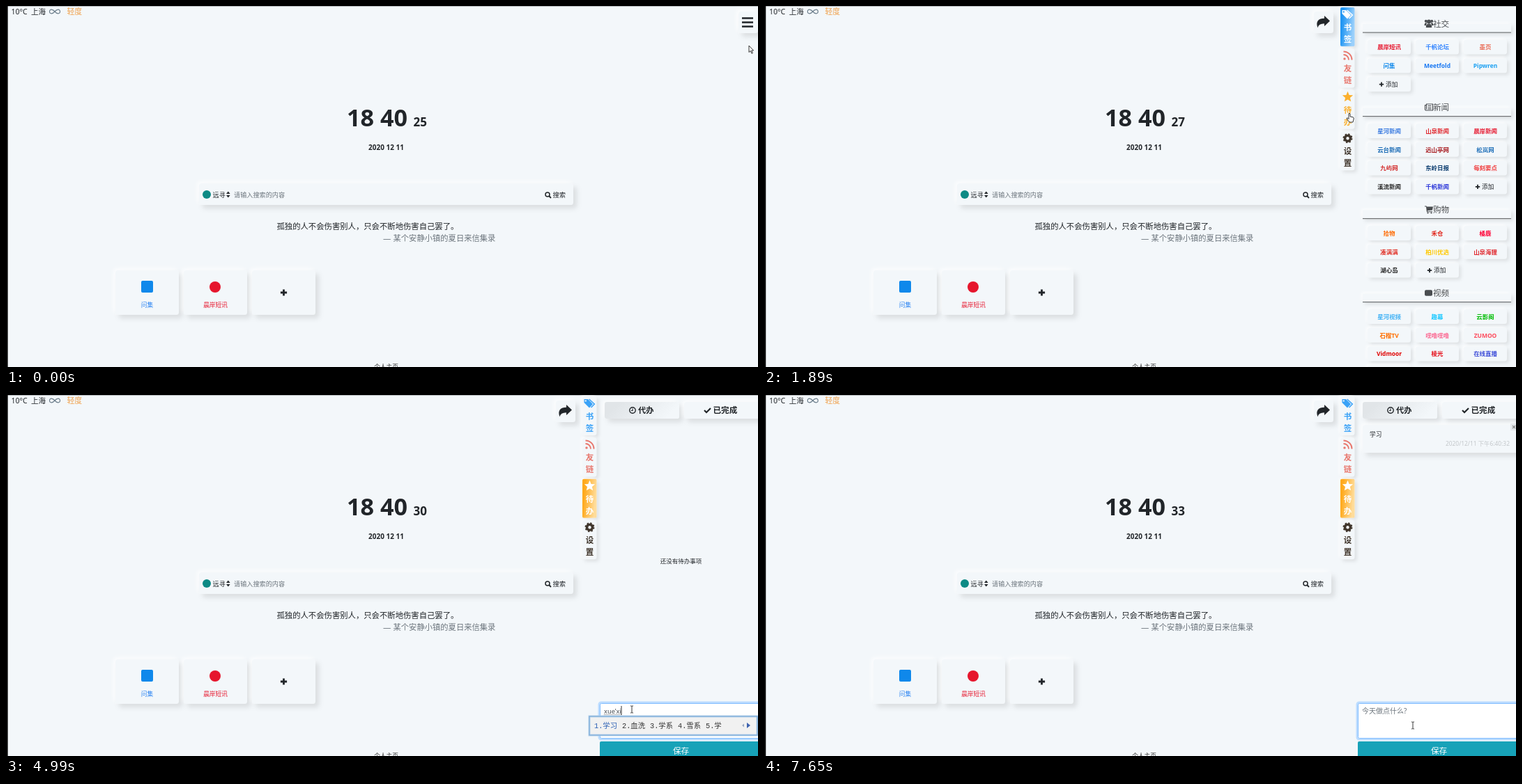
Animation of 1079x519 px, one loop 8000 ms. Source, as an HTML page:

```html
<!DOCTYPE html>
<html lang="zh-CN">
<head>
<meta charset="utf-8">
<title>个人主页</title>
<style>
html, body { margin: 0; width: 100%; height: 100%; overflow: hidden; background: #f3f7fa; }
svg { display: block; width: 1079px; height: 519px; font-family: "Noto Sans", "Noto Sans CJK SC", "Noto Sans CJK", sans-serif; }
text { white-space: pre; }
.raised { fill: #f3f7fa; filter: drop-shadow(5px 5px 3.5px rgba(0, 0, 0, .1)) drop-shadow(-3px -3px 3px rgba(255, 255, 255, .7)); }
.small { filter: drop-shadow(3px 3px 2.5px rgba(0, 0, 0, .09)) drop-shadow(-2px -2px 2px rgba(255, 255, 255, .7)); }
</style>
</head>
<body>
<svg id="stage" viewBox="0 0 1079 519"></svg>
<script>
const INK = '#212529', GREY = '#6c757d';
const BOLD = 'font-weight="700"', MID = 'text-anchor="middle"';

const text = (x, y, size, str, fill = INK, attrs = '') =>
  `<text x="${x}" y="${y}" font-size="${size}" fill="${fill}" ${attrs}>${str}</text>`;
const rect = (x, y, w, h, attrs = '') =>
  `<rect x="${x}" y="${y}" width="${w}" height="${h}" ${attrs}/>`;
const raised = (x, y, w, h, cls = '') => rect(x, y, w, h, `rx="3.5" class="raised ${cls}"`);
const path = (d, fill = INK, attrs = '') => `<path d="${d}" fill="${fill}" ${attrs}/>`;
const line = (d, color, width, attrs = '') =>
  path(d, 'none', `stroke="${color}" stroke-width="${width}" ${attrs}`);
const circle = (x, y, r, attrs) => `<circle cx="${x}" cy="${y}" r="${r}" ${attrs}/>`;
const at = (x, y, body) => `<g transform="translate(${x} ${y})">${body}</g>`;
const plus = (x, y, r, w) => line(`M${x - r} ${y}h${2 * r}M${x} ${y - r}v${2 * r}`, INK, w);
const gradient = (id, from, to) => `<linearGradient id="${id}" x2="1" y2=".25">
  <stop offset=".2" stop-color="${from}"/><stop offset="1" stop-color="${to}"/></linearGradient>`;

// Start page behind the drawer
function page() {
  const card = (x, label, color, icon) => raised(x, 380, 91, 64) + icon +
    (label ? text(x + 45.5, 433, 8.7, label, color, MID) : '');
  return rect(0, 0, 1079, 519, 'fill="#f3f7fa"') +
    rect(0, 0, 1079, 1, 'fill="#b4b8bb"') + rect(0, 0, 2.6, 519, 'fill="#000"') +
    text(7.5, 12, 10.5, '10°C') + text(36, 12, 10.5, '上海') + text(87.5, 12, 10.8, '轻度', '#f0a04b') +
    line('M70 8C67 4.5 62.5 4 62.5 8S67 11.5 70 8S77.5 4 77.5 8S73 11.5 70 8Z', '#6d7f8c', 1.2) +
    text(532.5, 173, 34.2, '18 40', INK, `${MID} ${BOLD}`) +
    text(545.5, 207, 10, '2020 12 11', INK, `${MID} ${BOLD}`) +
    raised(277, 255, 537, 31) + circle(288, 271, 6, 'fill="#0d8a85"') +
    text(296.5, 275, 9.2, '远寻') + path('M316 270l2.8-3.6l2.8 3.6zM316 272l2.8 3.6l2.8-3.6z') +
    text(327, 275, 9.15, '请输入搜索的内容', GREY) +
    circle(777, 271, 3, `fill="none" stroke="${INK}" stroke-width="1.5"`) + line('M779 273l3 3', INK, 1.8) +
    text(784.5, 275, 9.3, '搜索') +
    text(388.5, 320.5, 11.35, '孤独的人不会伤害别人，只会不断地伤害自己罢了。') +
    text(541, 337.5, 11.3, '—', GREY) + text(555.5, 337.5, 11.3, '某个安静小镇的夏日来信集录', GREY) +
    card(157, '问集', '#2a83f2', rect(194, 395, 17, 17, 'rx="2" fill="#0f88eb"')) +
    card(255, '晨岸短讯', '#e6162d', circle(300, 404, 8, 'fill="#e6162d"')) +
    card(353, '', '', plus(398.5, 412, 4.6, 2.8)) +
    text(545.5, 522, 8.7, '个人主页', '#333', MID);
}

const gear = c => circle(0, 0, 4, `fill="none" stroke="${c}" stroke-width="3.6"`) +
  circle(0, 0, 6, `fill="none" stroke="${c}" stroke-width="2" stroke-dasharray="2.36"`);
const star = c => path('M' + Array.from({ length: 10 }, (_, i) => {
  const a = i * Math.PI / 5, r = i % 2 ? 3.6 : 8;
  return `${(r * Math.sin(a)).toFixed(2)} ${(-r * Math.cos(a)).toFixed(2)}`;
}).join('L') + 'Z', c);
const rss = c => circle(-4.5, 4.5, 1.7, `fill="${c}"`) +
  line('M-6 -1.5A7.5 7.5 0 0 1 1.5 6M-6 -6A12 12 0 0 1 6 6', c, 2);
const tags = c => path('M-8 -6h5.5l7 7l-5 5.5l-7.5-7.5zM-5.8 -4.8a1.2 1.2 0 1 0 .1 0z', c, 'fill-rule="evenodd"') +
  line('M-.8 -6l7.6 7l-4.8 5', c, 1.5);

const TABS = [
  ['书签', '#3aa2f7', tags], ['友链', '#e8776d', rss], ['待办', '#fbb02d', star], ['设置', '#40362c', gear]
];
const tabs = active => TABS.map(([label, color, icon], i) => {
  const y = 2 + i * 59.4, on = i === active, c = on ? '#fff' : color;
  return raised(827, y, 20.5, 56, 'small') +
    (on ? rect(827, y, 20.5, 56, `rx="2" fill="url(#tab${i})"`) : '') +
    at(837.5, y + 10, icon(c)) +
    [...label].map((ch, k) => text(837.5, y + 33 + k * 17, 11.5, ch, c, `${MID} ${BOLD}`)).join('');
}).join('');

const HEAD = '#4a4d50';
const people = circle(6, 3.5, 3, `fill="${HEAD}"`) + circle(1.8, 2.8, 2, `fill="${HEAD}"`) +
  circle(10.2, 2.8, 2, `fill="${HEAD}"`) + path('M1.8 12Q1.5 6.5 6 6.5T10.2 12zM-.5 9Q-.5 4.5 3 5L2 9zM12.5 9Q12.5 4.5 9 5L10 9z', HEAD);
const paper = line('M2.5 1.5h9v9h-10q-1-.5-1-1.5v-6h2zM2.5 3v6M4.5 6.5h5M4.5 8.5h5M4.5 4h5', HEAD, 1.1);
const cart = path('M0 1h2.5l.5 1h9l-1 5l-7 .8v1h7v1h-8l-.3-2L2 2H0z', HEAD) +
  circle(4.5, 11, 1.1, `fill="${HEAD}"`) + circle(9.5, 11, 1.1, `fill="${HEAD}"`);
const screen = rect(0, 1.7, 11, 8.5, `rx="2" fill="${HEAD}"`);

const SECTIONS = [
  [25, '社交', people, '晨岸短讯 #e6162d 千帆论坛 #3385ff 墨页 #ea6f5a 问集 #0f88eb Meetfold #1877f2 Pipwren #1da1f2'],
  [145.5, '新闻', paper, '星河新闻 #3a7be0 山泉新闻 #e0282e 晨岸新闻 #e6162d 云台新闻 #1a6bb5 远山亭网 #a81e22 松岚网 #1e6fb8 ' +
    '九屿网 #d32f2f 东岭日报 #0b3c6f 每刻要点 #f04142 溪流新闻 #222 千帆新闻 #2b36d9'],
  [292.5, '购物', cart, '拾物 #ff6a00 禾仓 #e1251b 橘鹿 #ff0036 凑满满 #e02e24 柏川优选 #ffc800 山泉海狸 #e0282e 湖心岛 #222'],
  [412.5, '视频', screen, '星河视频 #3fb1f5 趣幕 #1ac8ff 云影阁 #00be06 石榴TV #ff6f00 噗噜噗噜 #fb7299 ZUMOO #fd4c5d ' +
    'Vidmoor #e00000 棱光 #e50914 在线直播 #3b4bd8']
];
const bookmarks = () => SECTIONS.map(([y, title, icon, list]) => {
  const words = list.split(' ');
  const link = i => {
    const cx = 897 + i % 3 * 69, cy = y + 34 + Math.floor(i / 3) * 26.8, last = i * 2 === words.length;
    return raised(cx - 31, cy - 10.5, 62, 21, 'small') + (last
      ? plus(cx - 11, cy, 3.2, 1.8) + text(cx - 5, cy + 3.2, 8.7, '添加', INK, 'font-weight="500"')
      : text(cx, cy + 3.2, 8.45, words[2 * i], words[2 * i + 1], `${MID} ${BOLD}`));
  };
  return rect(859, y + 1, 213, 12.5, 'class="raised small"') + rect(859, y + 12.5, 213, 1.2, 'fill="#6f7274"') +
    at(948, y - 6, icon) + text(960, y + 4.5, 11.6, title, HEAD, 'font-weight="300"') +
    Array.from({ length: words.length / 2 + 1 }, (_, i) => link(i)).join('');
}).join('');

const todoTabs = () => raised(859, 10, 107, 24) + rect(859, 10, 107, 24, 'rx="3" fill="url(#pressed)"') +
  circle(899, 22, 4.2, `fill="none" stroke="${INK}" stroke-width="1.4"`) + line('M899 19.5v3h-2', INK, 1.1) +
  text(907, 26, 11.2, '代办', INK, BOLD) +
  raised(973, 10, 112, 24) + line('M1002 22l3 3l6-6', INK, 2.2) + text(1014.5, 26, 11.6, '已完成', INK, BOLD);

// Input method steps: [shown from, text, caret x, candidates]
const TYPING = [
  [0, '', 858.5], [3820, 'x', 863.5, '下想小些写'], [3940, 'xu', 868.5, '需许续徐须'], [4060, 'xue', 873.7, '学雪血薛穴'],
  [4870, 'xue’x', 880.5, '学习 学校 血型 学向 学'], [4990, 'xue’xi', 883, '学习 血洗 学系 雪系 学'],
  [5110, '学习', 878.5], [6460, '', 858.5]
];
const within = (t, ...spans) => spans.some(([a, b]) => t >= a && t < b);
const latest = (list, t) => list.filter(k => k[0] <= t).pop();

function popup(words) {
  const wide = words.includes(' '), list = wide ? words.split(' ') : [...words];
  const x = wide ? 837 : 860, w = wide ? 241 : 196, step = wide ? 40 : 29.4;
  return rect(x, 462, w, 27, 'fill="#f1f1f1" stroke="#b9d3ec" stroke-width="3"') +
    rect(x, 462, w, 27, 'fill="none" stroke="#6fa3d4" stroke-width="1"') +
    list.map((c, i) => text(x + 7 + i * step, 479, 10.3, `${i + 1}.${c}`, i ? '#333' : '#2a5fb4',
      'font-family="Liberation Mono, Noto Sans CJK SC, monospace"')).join('') +
    path(`M${x + w - 19} 472.5v5l-3-2.5z`, '#9aa9c4') + path(`M${x + w - 15} 471v8l5-4z`, '#3d62b0');
}

function todo(t) {
  const [, typed, caretX, words] = latest(TYPING, t);
  const focus = within(t, [3080, 6460], [7150, 8000]), pressed = within(t, [6310, 7150]);
  const caret = within(t, [2930, 3520], [3820, 4620], [4870, 5690], [7280, 7650]);
  const fill = within(t, [6310, 6460]) ? '#117a8b' : within(t, [6190, 7150]) ? '#138496' : '#17a2b8';
  const item = raised(859, 43, 226, 40) + text(869, 60, 8.7, '学习') +
    text(978, 73, 8.4, '2020/12/11 下午6:40:32', '#c3c7ca') +
    rect(1071, 41, 10, 10, 'fill="#e3e7ea"') + line('M1074 44l4 4m0-4l-4 4', '#888', 1.4);
  return (t < 6460 ? text(968.5, 242, 8.5, '还没有待办事项', INK, MID) : item) +
    (focus ? rect(851, 442, 240, 53, 'rx="3" fill="none" stroke="#bcdcff" stroke-width="3"') : '') +
    rect(852.5, 443.5, 240, 50, `rx="2" fill="${focus ? '#fff' : '#f6f9fb'}" stroke="${focus ? '#80bdff' : '#ced4da'}"`) +
    (typed ? text(858, 457.5, words ? 9.3 : 10, typed, '#495057') : text(858, 457.5, 10, '今天做点什么?', GREY)) +
    (words ? line(`M858 459.5H${caretX}`, '#555', .8, 'stroke-dasharray="1"') : '') +
    (caret ? rect(caretX - .5, 447, 1, 13, 'fill="#333"') : '') + (words ? popup(words) : '') +
    (pressed ? rect(850.8, 496.8, 240, 40, 'rx="3" fill="none" stroke="#8ccfdb" stroke-width="2.4"') : '') +
    rect(852, 498, 240, 36, `rx="2" fill="${fill}"`) + text(968.5, 516, 11.6, '保存', '#fff', MID);
}

const clamp = v => Math.min(1, Math.max(0, v));
const smooth = v => v * v * (3 - 2 * v);

const MOVES = [
  [0, 1066, 57], [370, 1063, 32], [640, 1063, 32], [1050, 1012, 38], [1290, 1000, 46], [1770, 851, 146],
  [1890, 840, 154], [2010, 840, 154], [2150, 879, 126], [2540, 912, 433], [2690, 906, 476], [2930, 898, 452],
  [5570, 898, 452], [5930, 906, 474], [6070, 926, 503], [6460, 926, 503], [6850, 931, 477], [7000, 931, 475], [8000, 931, 475]
];
function cursor(t) {
  const i = MOVES.findIndex(m => m[0] > t), [t0, x0, y0] = MOVES[i - 1], [t1, x1, y1] = MOVES[i];
  const k = (t - t0) / (t1 - t0), x = x0 + (x1 - x0) * k, y = y0 + (y1 - y0) * k;
  const edge = 'stroke="#222" stroke-width=".9" stroke-linejoin="round"';
  const hand = y > 497 || x < 848 || (x > 1051 && y < 39);
  return at(x, y, hand
    ? path('M-1 1Q0 -.8 1 1V5L5 5.8Q6.4 6.4 6.2 8L5 13H0L-3.8 8Q-4 6.4 -2.5 7L-1 8.5Z', '#fff', edge)
    : y > 442 ? line('M-2 -5h1.5l.5.5l.5-.5h1.5M0 -4.5v9M-2 5h1.5l.5-.5l.5.5h1.5', '#222', .9)
    : path('M0 0V9.5L2.2 7.5L4 11.3L5.4 10.7L3.7 7H6.6Z', '#fff', edge));
}

const stage = document.getElementById('stage');
stage.innerHTML = `<defs>${gradient('tab0', '#2196f3', '#9bd0fb')}${gradient('tab2', '#ffaa1d', '#ffdd9c')}
  ${gradient('pressed', '#e1e5e8', '#f3f7fa')}</defs>${page()}
  <g id="seconds"></g>
  <g id="drawer">${raised(789, 8, 28, 31)}
    <g id="bars">${line('M794 17.5h16M794 23.5h16M794 29.5h16', INK, 2.6)}</g>
    <g id="share">${path('M812 21.5L804 14V17.8C796 17.8 791 22 794.5 31.3Q795.5 25.3 804 25.3V29Z')}</g>
    <g id="links">${tabs(0)}${bookmarks()}</g>
    <g id="tasks">${tabs(2)}${todoTabs()}<g id="todo"></g></g>
  </g><g id="pointer"></g>`;
const part = id => document.getElementById(id);
const show = (id, on) => { part(id).style.display = on ? '' : 'none'; };

// The screen refreshes only at these moments
const TICKS = [0, 120, 250, 370, 640, 760, 910, 1050, 1170, 1290, 1410, 1530, 1650, 1770, 1890, 2010, 2150, 2300, 2420, 2540,
  2690, 2810, 2930, 3080, 3520, 3670, 3820, 3940, 4060, 4620, 4870, 4990, 5110, 5570, 5690, 5810, 5930, 6070, 6190, 6310,
  6460, 6610, 6730, 6850, 7000, 7150, 7280, 7530, 7650];
const SECONDS = [910, 1770, 2690, 3670, 4620, 5570, 6610, 7530];

let shown = -1;
function draw(time) {
  const t = TICKS.filter(k => k <= time).pop();
  if (t === shown) return;
  shown = t;
  const shift = 262 * (1 - smooth(clamp((t - 645) / 455)));
  part('drawer').setAttribute('transform', `translate(${shift.toFixed(1)} 0)`);
  part('seconds').innerHTML = text(584.5, 173, 17, 25 + SECONDS.filter(s => s <= t).length, INK, BOLD);
  show('bars', t < 640);
  show('share', t >= 640);
  show('links', t < 2010);
  show('tasks', t >= 2010);
  part('todo').innerHTML = todo(t);
  part('pointer').innerHTML = cursor(t);
}

const start = performance.now();
function loop(now) {
  draw(Math.max(0, now - start) % 8000);
  requestAnimationFrame(loop);
}
draw(0);
requestAnimationFrame(loop);
</script>
</body>
</html>
```
